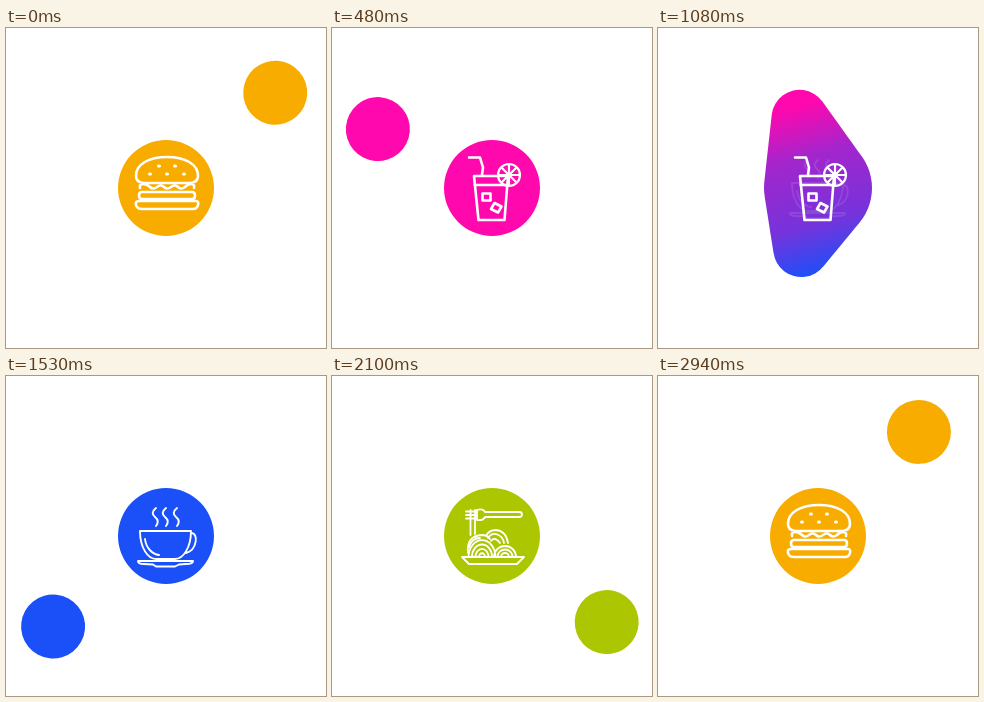
Animation of 320x320 px, one loop 2970 ms. Source, as an HTML page with a canvas:

```html
<!DOCTYPE html>
<html lang="en">
<head>
<meta charset="utf-8">
<title>Food loader</title>
<style>
html, body { margin: 0; width: 100%; height: 100%; overflow: hidden; background: #fff; }
canvas { display: block; width: 320px; height: 320px; }
</style>
</head>
<body>
<canvas id="stage"></canvas>
<script>
const LOOP = 2970, STEP = 30, TURN = 750, MID = 160;
const COLORS = [[248, 172, 0], [255, 8, 174], [27, 80, 249], [172, 199, 2]];
const canvas = document.getElementById('stage');
const scale = window.devicePixelRatio || 1;
canvas.width = canvas.height = 320 * scale;
const ctx = canvas.getContext('2d');
const clamp = x => Math.max(0, Math.min(1, x));
const mix = (a, b, f) => `rgb(${a.map((v, i) => v + (b[i] - v) * f)})`;

const dot = (x, y) => `M${x - .5} ${y}h1`;
const arch = (x, y, rx, ry = rx) => `M${x - rx} ${y}a${rx} ${ry} 0 0 1 ${2 * rx} 0`;
const steam = x => `M${x} 132q-6 5 -1 9t1 9`;

function lemon(x, y, r) {
  let d = `M${x - r} ${y}a${r} ${r} 0 1 1 ${2 * r} 0a${r} ${r} 0 1 1 ${-2 * r} 0`;
  for (let i = 0; i < 4; i++) {
    const c = Math.cos(i * Math.PI / 4) * r, s = Math.sin(i * Math.PI / 4) * r;
    d += `M${x - c} ${y - s}L${x + c} ${y + s}`;
  }
  return d;
}

// Each icon is a list of [line width, path]
const icons = [
  // burger
  [[2.6, 'M137 155Q130 154 130 148C130 136 143 129 161 129S192 136 192 148Q192 154 185 155Z'
    + 'M134 160q-1 -4 3 -4q4 0 7 3t7 0t7 0t7 0t7 0t7 0q3 -3 6 -3q4 0 3 4'
    + 'M136 164h50q3 0 3 3.5t-3 3.5h-50q-3 0 -3 -3.5t3 -3.5Z'
    + 'M133 173h57q3 0 2 4q-1 4 -5 4h-51q-5 0 -6 -4q-1 -4 3 -4Z'],
   [3, dot(153, 138) + dot(169, 138) + dot(144, 146) + dot(161, 146) + dot(178, 146)]],
  // iced drink
  [[2.6, 'M137 129.5h11l3 10l-1 7M142 148h34l-3.5 44h-26ZM142.5 157h32'
    + 'M150.5 165.5h8v7h-8ZM162.5 175l7 3.5l-3.5 6l-7 -3.5Z'],
   [2.2, lemon(177, 147, 11)]],
  // coffee cup
  [[1.9, steam(150) + steam(160) + steam(171)
    + 'M134 155h51C185 172 177 183 169 183h-19C142 183 134 172 134 155Z'
    + 'M185 157C193 157 191 174 180 177M139 163C140 172 146 178 153 179'
    + 'M132 185h55q0 3 -7 3l-7 .5l-4 2h-19l-3 -2l-9 -.5q-6 0 -6 -3Z']],
  // spaghetti
  [[1.8, 'M134 135.5h11M134 139h11M134 142.5h11M145 134v10q6 1 8 -3h34q3 0 3 -2.5t-3 -2.5h-34q-2 -4 -8 -2'
    + 'M138.5 134v25M143 134v24M130 181h62l-7 7h-48Z'
    + 'M136 177q-2 -17 14 -18q5 0 8 4M137 171q3 -9 11 -9'
    + [3, 6.5, 10, 13.5].map(r => arch(150, 181, r, r * 1.25)).join('')
    + [4, 7.5, 11].map(r => arch(173, 181, r)).join('')
    + 'M154 160q3 -6 10 -6q10 1 12 13M156 162q3 -5 8 -4q7 2 8 9M159 165q4 -5 9 2']]
].map(layers => layers.map(([width, d]) => [width, new Path2D(d)]));

function drawIcon(i, alpha) {
  ctx.globalAlpha = alpha;
  for (const [width, path] of icons[i]) {
    ctx.lineWidth = width;
    ctx.stroke(path);
  }
  ctx.globalAlpha = 1;
}

// Satellite number k at p ms relative to its colour's reference pose
function satellite(k, p) {
  const d = 145 * (1 - Math.pow(Math.min(1, Math.abs(p + 38) / 457), 3.2));
  const merge = clamp((112 - d) / 40);
  return { d, merge, r: 32 - 4 * merge, angle: -41.1 + .08 * p - 90 * k };
}

function addDisc(path, x, y, r) {
  path.moveTo(x + r, y);
  path.arc(x, y, r, 0, 2 * Math.PI);
}

// Neck between the centre and a satellite: straight tangents up close, pinched further out
function addNeck(path, { d, r }, R) {
  if (d <= R - r || d > 112) return;
  const tangent = Math.acos((R - r) / d);
  const k = 1 - .6 * clamp((d - 80) / 32);
  const a = tangent * k, b = Math.PI - (Math.PI - tangent) * k;
  const x1 = R * Math.cos(a), y1 = R * Math.sin(a);
  const x2 = d + r * Math.cos(b), y2 = r * Math.sin(b);
  const h = .38 * Math.hypot(x2 - x1, y2 - y1);
  const hx1 = x1 + h * Math.sin(a), hy1 = y1 - h * Math.cos(a);
  const hx2 = x2 - h * Math.sin(b), hy2 = y2 + h * Math.cos(b);
  path.moveTo(x1, -y1);
  path.bezierCurveTo(hx1, -hy1, hx2, -hy2, x2, -y2);
  path.lineTo(x2, y2);
  path.bezierCurveTo(hx2, hy2, hx1, hy1, x1, y1);
  path.closePath();
}

function blob(balls, R) {
  const path = new Path2D();
  addDisc(path, MID, MID, R);
  for (const ball of balls.filter(b => b.d > 0)) {
    const arm = new Path2D();
    addDisc(arm, ball.d, 0, ball.r);
    addNeck(arm, ball, R);
    path.addPath(arm, new DOMMatrix().translate(MID, MID).rotate(ball.angle));
  }
  return path;
}

// The colour sweeps from the new side of the blob to the old side
function sweep(from, to, angle, p) {
  const c = Math.cos(angle * Math.PI / 180), s = Math.sin(angle * Math.PI / 180);
  const shift = (p - 330) * 2.2, a = shift - 85, b = shift + 85;
  const g = ctx.createLinearGradient(MID + c * a, MID + s * a, MID + c * b, MID + s * b);
  g.addColorStop(0, mix(to, from, 0));
  g.addColorStop(.3, mix(to, from, .4));
  g.addColorStop(.7, mix(to, from, .6));
  g.addColorStop(1, mix(to, from, 1));
  return g;
}

function draw(t) {
  const k = Math.floor(t / TURN), p = t % TURN, next = (k + 1) % 4;
  const arriving = satellite(k, p), leaving = satellite(k + 1, p - TURN);
  const swell = Math.max(
    arriving.merge * clamp((419 - p) / 60),
    leaving.merge * clamp((p - 255) / 60));

  ctx.setTransform(scale, 0, 0, scale, 0, 0);
  ctx.clearRect(0, 0, 320, 320);
  ctx.fillStyle = sweep(COLORS[k], COLORS[next], arriving.angle, p);
  ctx.fill(blob([arriving, leaving], 48 + 6 * swell));

  ctx.strokeStyle = '#fff';
  ctx.lineCap = ctx.lineJoin = 'round';
  drawIcon(k, 1 - clamp((p - 340) / 110));
  drawIcon(next, clamp((p - 315) / 135));
}

const start = performance.now();
function tick() {
  const t = (performance.now() - start) % LOOP;
  draw(Math.floor(t / STEP) * STEP);
  requestAnimationFrame(tick);
}
tick();
</script>
</body>
</html>
```
